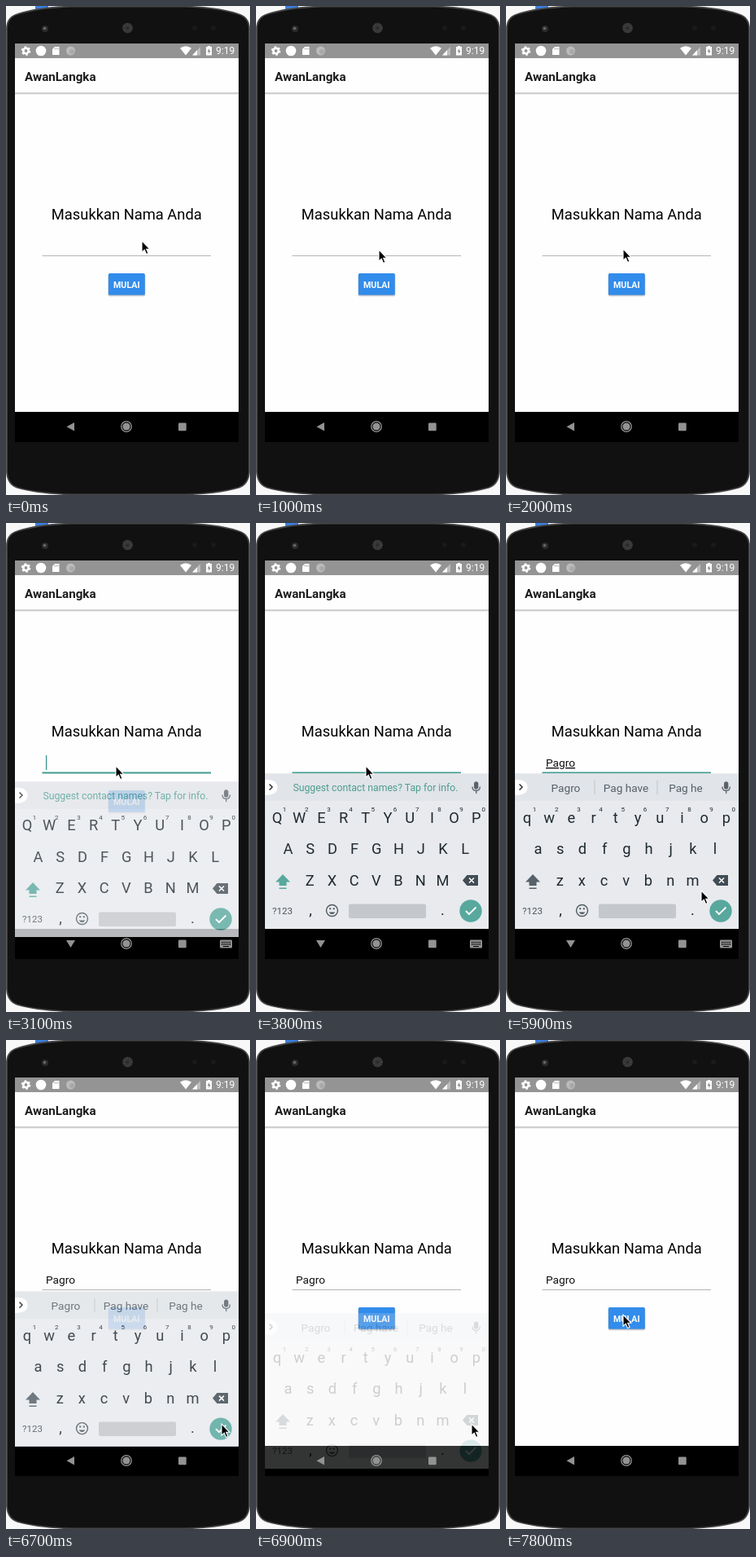
An HTML page that plays this animation: 300 by 600 pixels, repeating every 8000 ms.

```html
<!DOCTYPE html>
<html lang="id">
<head>
<meta charset="utf-8">
<style>
html, body { margin: 0; width: 100%; height: 100%; overflow: hidden; background: #f8f8f9 }
svg { display: block; width: 300px; height: 600px; font-family: Roboto, sans-serif }
.mid { text-anchor: middle }
</style>
</head>
<body>
<svg viewBox="0 0 300 600">
  <!-- phone body -->
  <path d="M36 0H52V4H36Z" fill="#3c7fe0"/>
  <path d="M1 28Q1 14 14 10Q38 2 80 .5H220Q262 2 286 10Q299 14 299 28V572Q298 587 286 591Q262 598 220 599.5H80Q38 598 14 591Q2 587 1 572Z" fill="#111" stroke="#454545" stroke-width="1.800"/>
  <circle cx="48" cy="28" r="4" fill="#2c2c2e"/><circle cx="47.500" cy="27.500" r="1.800" fill="#66686b"/>
  <circle cx="149.500" cy="27" r="6.500" fill="#2b2b2b"/>
  <circle cx="149.500" cy="27" r="4" fill="none" stroke="#484848" stroke-width="4" stroke-dasharray="1 1"/>
  <g fill="#1a1a1a"><circle cx="232" cy="27" r="3"/><circle cx="255" cy="27" r="3"/></g>

  <!-- screen -->
  <path d="M11 46H286V535H11Z"/>
  <path d="M11 64H286V498H11Z" fill="#fefefe"/>
  <path d="M11 46H286V64H11Z" fill="#949494"/>
  <path d="M11 106H286V108H11Z" fill="#cfcfcf"/><path d="M11 108H286V109H11Z" fill="#efefef"/>

  <!-- status bar -->
  <g fill="#fff">
    <circle cx="24.500" cy="55" r="3.200" fill="none" stroke="#fff" stroke-width="2.600"/>
    <circle cx="24.500" cy="55" r="5" fill="none" stroke="#fff" stroke-width="1.600" stroke-dasharray="2.600 2.636"/>
    <circle cx="43" cy="55" r="6.300"/>
    <path d="M60 50H65.500V60H57V53Z"/>
    <path d="M60 51.500v2M62 51.500v2M64 51.500v2" stroke="#949494" stroke-width=".8"/>
    <circle cx="79.500" cy="55" r="5.500" fill="#bbb"/><circle cx="81" cy="56" r="3" fill="#a9a9a9"/>
    <path d="M214 51.800Q221 46.800 228 51.800L221 60.500Z"/>
    <path d="M229 60.500L239 50V60.500Z" fill="#bdbdbd"/><path d="M229 60.500L235 54.200V60.500Z"/>
    <path d="M248 50V49h3v1h2V60.500h-7V50Z"/>
    <path d="M250 52l-2.300 4h1.600v3l2.300-4.200h-1.600Z" fill="#888"/>
    <text x="258" y="59.300" font-size="12">9:19</text>
  </g>

  <!-- app -->
  <text x="23" y="91.500" font-size="15.200" font-weight="700" fill="#1c1c1c">AwanLangka</text>
  <text class="mid" x="148.300" y="261.700" font-size="18.350">Masukkan Nama Anda</text>
  <path id="line" d="M44.500 306.500H252"/>
  <text id="field" x="49" y="299" font-size="13.700" fill="#111"></text>
  <path id="caret" d="M49.600 285V303" stroke="#429b91" stroke-width="1.400"/>
  <rect x="125.500" y="329" width="46" height="27.500" rx="2" fill="#ddd"/>
  <rect x="125.700" y="328.500" width="45.300" height="26.800" rx="2" fill="#9ba9bb"/>
  <rect x="126" y="328" width="44.700" height="26.500" rx="1.500" fill="#318ceb"/>
  <text class="mid" x="148.300" y="345.500" font-size="10.700" font-weight="700" fill="#fff">MULAI</text>

  <!-- on-screen keyboard -->
  <g id="board">
    <path d="M11 307.500H286V498H11Z" fill="#e8eaee"/>
    <path d="M11 307.500H286V341H11Z" fill="#e1e4e8"/>
    <path d="M11 315Q26 314 26.500 324T11 334Z" fill="#fff"/>
    <path d="M16.500 320.500l3.500 3.500-3.500 3.500" fill="none" stroke="#333" stroke-width="1.500"/>
    <text id="hint" class="mid" x="147" y="329" font-size="12.240" fill="#4c9d92">Suggest contact names? Tap for info.</text>
    <g id="words" class="mid" font-size="13.600" fill="#545f67">
      <text x="73.500" y="329.700"></text><text x="147.500" y="329.700"></text><text x="221" y="329.700"></text>
      <path d="M109 316V333M186 316V333" stroke="#bfc4c9"/>
    </g>
    <g fill="none" stroke="#5a636a" stroke-width="1.300">
      <rect x="268.700" y="318" width="4" height="8" rx="2" fill="#5a636a"/>
      <path d="M266 323.500Q266 328.500 270.700 328.500T275.400 323.500M270.700 328.500V332"/>
    </g>
    <g id="keys" class="mid" font-size="18.300" fill="#1f2a30"></g>
    <path id="shift" d="M33 431L42 440.500H37.500V445H28.500V440.500H24ZM28.500 447.500H37.500V449H28.500Z"/>
    <path d="M254 438.500L259.500 432H273V445H259.500Z" fill="#414c54"/>
    <path d="M262 435.500l6 6m0-6l-6 6" stroke="#fff" stroke-width="1.500"/>
    <text class="mid" x="32.500" y="480" font-size="11.500" fill="#4b555c">?123</text>
    <g fill="none" stroke="#4e5960" stroke-width="1.400">
      <circle cx="93.500" cy="475.500" r="7"/><path d="M89.500 477.500Q93.500 482.500 97.500 477.500Z" fill="#4e5960" stroke="none"/>
      <path d="M90.200 473.300h2M94.800 473.300h2" stroke-width="2"/>
    </g>
    <rect x="114" y="467.500" width="95" height="17.500" rx="2" fill="#c4c7cb"/>
    <circle cx="264" cy="476" r="13.700" fill="#58a89e"/>
    <path d="M258 476l4 4 8.500-8.500" fill="none" stroke="#fff" stroke-width="1.900"/>
  </g>

  <!-- navigation bar -->
  <g fill="#929292">
    <path id="back"/>
    <circle cx="148" cy="516" r="6.300" fill="none" stroke="#929292" stroke-width="1.300"/><circle cx="148" cy="516" r="4.600"/>
    <rect x="212" y="511.500" width="9.700" height="9.700" rx="1"/>
    <g id="switcher">
      <rect x="263" y="511.500" width="15" height="10" rx="1"/>
      <path d="M265 514.500H276M265 517H276" stroke="#000" stroke-width="1.300" stroke-dasharray="1.400 1"/><path d="M267 519.500h7" stroke="#000"/>
    </g>
  </g>

  <path id="cursor" d="M0 0V14.200L3.300 11.200 5.600 16.600 8 15.500 5.700 10.300H10Z" stroke="#fff" stroke-width="1.100"/>
</svg>

<script>
const $ = id => document.getElementById(id);
const show = (id, on) => $(id).style.display = on ? '' : 'none';
const NAME = 'Pagro', LOOP = 8000, FOCUS = 2950, BLUR = 6650;
const KEYED_AT = [4000, 4300, 4600, 4900, 5200];

// time, x, y of the pointer tip
const PATH = [
  [0, 167, 288], [100, 166, 289], [400, 152, 299], [1600, 150, 299], [2000, 144, 298],
  [2400, 135, 298], [5200, 135, 298], [5500, 254, 473], [5700, 254, 473], [5900, 240, 451],
  [6200, 240, 451], [6500, 265, 471], [6950, 265, 471], [7400, 161, 330], [7600, 137, 344],
  [7700, 144, 337], [LOOP, 144, 337]
];

function addKey(x, y, label, size = '') {
  const key = document.createElementNS('http://www.w3.org/2000/svg', 'text');
  key.setAttribute('x', x);
  key.setAttribute('y', y);
  if (size) key.setAttribute('font-size', size);
  key.textContent = label;
  $('keys').append(key);
  return key;
}

const letters = [];
[['QWERTYUIOP', 26], ['ASDFGHJKL', 39.5], ['ZXCVBNM', 66.2]].forEach(([row, x], r) =>
  [...row].forEach((c, i) => letters.push(addKey(x + 27.2 * i, 367.5 + 38.5 * r, c))));
for (let i = 0; i < 10; i++) addKey(35 + 27.2 * i, 354.3, (i + 1) % 10, 8);
addKey(67, 481, ',');
addKey(229.5, 481, '.');

function pointer(t) {
  const i = PATH.findIndex(p => p[0] > t);
  const [t0, x0, y0] = PATH[i - 1], [t1, x1, y1] = PATH[i];
  const k = (t - t0) / (t1 - t0);
  return [x0 + (x1 - x0) * k, y0 + (y1 - y0) * k];
}

function draw(now) {
  const t = Math.floor(now % LOOP / 100) * 100;
  const focused = t >= FOCUS && t < BLUR;
  const count = KEYED_AT.filter(k => k <= t).length;
  const typed = NAME.slice(0, count);

  // keyboard slides and fades in, then out
  const enter = Math.min(1, Math.max(0, (t - FOCUS) / 350));
  const leave = Math.min(1, Math.max(0, (t - BLUR) / 320));
  $('board').setAttribute('transform', `translate(0 ${30.5 * (1 - enter) ** 2 + 46 * leave ** 2})`);
  $('board').setAttribute('opacity', Math.min(1, 1.85 * enter) * (1 - leave));

  for (const key of letters)
    key.textContent = count ? key.textContent.toLowerCase() : key.textContent.toUpperCase();
  $('shift').setAttribute('fill', count ? '#56616a' : '#58a89e');
  show('hint', !count);
  show('words', count);
  const stem = typed.slice(0, 3);
  [typed, stem + ' have', stem + ' he'].forEach((w, i) => $('words').children[i].textContent = w);

  $('field').textContent = typed;
  $('field').setAttribute('text-decoration', focused ? 'underline' : 'none');
  $('line').setAttribute('stroke', focused ? '#429b91' : '#b4b4b4');
  $('line').setAttribute('stroke-width', focused ? 1.8 : 1);
  const blinkStart = count ? KEYED_AT[count - 1] : 3000;
  show('caret', focused && (t - blinkStart) % 1000 < 500);
  $('caret').setAttribute('transform', `translate(${count ? $('field').getComputedTextLength() : 0} 0)`);

  show('switcher', focused);
  $('back').setAttribute('d', focused ? 'M74 512H85L79.500 521Z' : 'M84 511V521.500L74.500 516.200Z');
  $('cursor').setAttribute('transform', `translate(${pointer(t)})`);
}

function loop() {
  draw(performance.now());
  requestAnimationFrame(loop);
}
loop();
</script>
</body>
</html>
```
